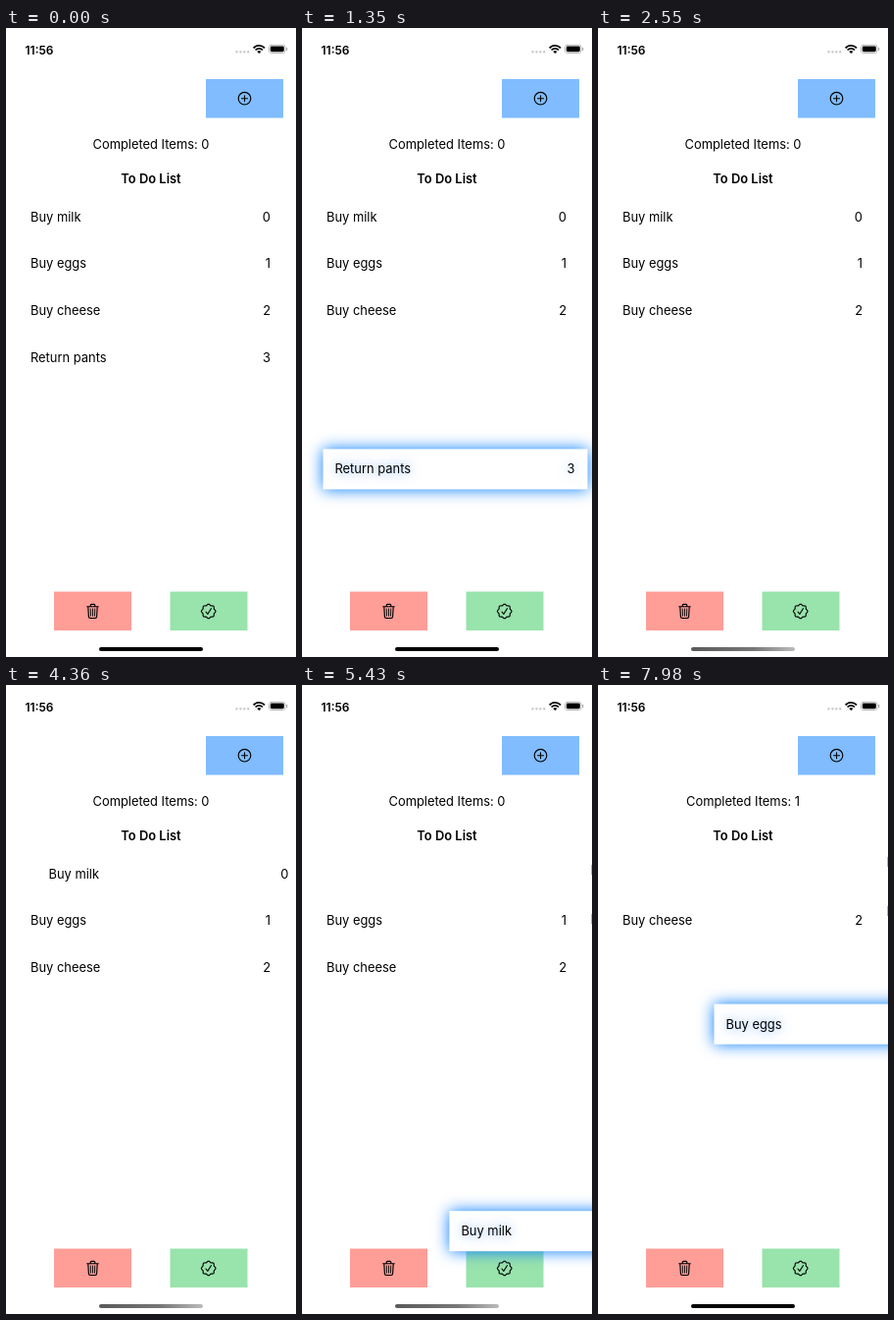
These frames come from a looping animation (296x640 px, 8000 ms). An HTML page:

```html
<!DOCTYPE html>
<html lang="en">
<head>
<meta charset="utf-8">
<title>To Do List</title>
<style>
  html, body { margin: 0; width: 100%; height: 100%; overflow: hidden; background: #fff; }
  #stage {
    position: relative; width: 296px; height: 640px; overflow: hidden; background: #fff;
    font: 12.9px/41px Inter, "Open Sans", sans-serif; color: #000;
  }
  #stage > * { position: absolute; }
  svg { left: 0; top: 0; }
  .line { left: 0; top: 98px; width: 296px; text-align: center; }
  .title { top: 133px; font-weight: 600; }
  .clock { left: 19.5px; top: 1.5px; font-size: 12px; font-weight: 600; }
  .row {
    left: 12.5px; width: 270px; height: 41px; padding: 0 12.5px; box-sizing: border-box;
    display: flex; justify-content: space-between; background: #fff;
  }
  #bar { left: 95px; top: 629.6px; width: 106px; height: 4px; border-radius: 2px; background: #000; }
  #edge {
    left: 295px; top: 183px; width: 1px; height: 60px;
    background: linear-gradient(#bbb 10px, transparent 0 50px, #bbb 0);
  }
</style>
</head>
<body>
<div id="stage">
  <svg width="296" height="640" fill="none" stroke="#000" stroke-width="1.15" stroke-linecap="round" stroke-linejoin="round">
    <g stroke="none">
      <path fill="#80bcff" d="M204 52h79v39.500h-79z"/>
      <path fill="#ff9d97" d="M49 573.500h79v39.500h-79z"/>
      <path fill="#99e3ac" d="M167.500 573.500h79v39.500h-79z"/>
    </g>
    <path stroke="#c8c8c8" stroke-width="2.400" stroke-dasharray="0 3.900" d="M235.500 24.300h12"/>
    <g stroke-width="1.800" stroke-linecap="butt">
      <path d="M252.600 20.300a8 8 0 0 1 11.400 0"/>
      <path d="M254.700 22.500a5 5 0 0 1 7.200 0"/>
      <path fill="#000" stroke="none" d="M258.300 26l-2-2.100a2.900 2.900 0 0 1 4 0z"/>
    </g>
    <rect x="268.500" y="17.300" width="16.600" height="8.200" rx="2.500" stroke="#aaa" stroke-width=".8"/>
    <rect x="269.800" y="18.600" width="14" height="5.600" rx="1.400" fill="#000" stroke="none"/>
    <path d="M286.600 20.200v2.300" stroke="#aaa"/>
    <g transform="translate(243.500 71.700)">
      <circle r="6.300"/>
      <path d="M-3 0h6M0-3v6"/>
    </g>
    <g transform="translate(88.500 593.500)">
      <path d="M-5.800-4.800H5.800M-2.300-5v-1.100q0-1 1-1h2.600q1 0 1 1V-5M-4.700-4.600l.6 10q.1 1.600 1.600 1.600h5q1.500 0 1.600-1.600l.6-10"/>
      <path stroke-width=".9" d="M-2.200-2.500l.2 7.200M0-2.500v7.200M2.200-2.500l-.2 7.200"/>
    </g>
    <g transform="translate(206.700 593.500)">
      <path id="seal"/>
      <path d="M-2.700.5l1.900 2.300L2.700-2.800"/>
    </g>
  </svg>
  <div class="clock">11:56</div>
  <div class="line" id="none">Completed Items: 0</div>
  <div class="line" id="one">Completed Items: 1</div>
  <div class="line title">To Do List</div>
  <div id="bar"></div>
  <div id="edge"></div>
</div>
<script>
const LOOP = 8000, PITCH = 47.6, DELETED = 2550, COMPLETED = 6280;
const $ = id => document.getElementById(id);

// Plays [time, style] pairs as hard steps.
function play(el, ...steps) {
  const frames = [...steps, [LOOP, steps.at(-1)[1]]].map(([t, style]) =>
    ({ offset: t / LOOP, easing: 'step-end', ...style }));
  el.animate(frames, { duration: LOOP, iterations: Infinity });
}

const show = opacity => ({ opacity });

const pose = ([x, y], glow = 0, opacity = 1) => ({
  transform: `translate(${x}px, ${y}px)`,
  boxShadow: `0 0 16px rgba(0, 122, 255, ${glow})`,
  textShadow: `0 0 12px rgba(0, 122, 255, ${glow * 0.6})`,
  opacity
});

const lift = i => Math.min(1, i / 2);
const held = () => 1;
const settle = i => 1 - i / 6;

// A move from a to b in count hard steps; a higher power slows down sooner.
function move(start, end, count, a, b, power, glow) {
  return Array.from({ length: count }, (_, i) => {
    const k = i / (count - 1), eased = 1 - (1 - k) ** power;
    const time = Math.floor((start + (end - start) * k) / 10) * 10;
    return [time, pose(a.map((v, j) => v + (b[j] - v) * eased), glow(i))];
  });
}

function addRow(label, index, ...steps) {
  const row = document.createElement('div');
  row.className = 'row';
  row.style.top = 171.8 + PITCH * index + 'px';
  row.style.zIndex = 9 - index;
  for (const text of [label, index]) {
    row.appendChild(document.createElement('span')).textContent = text;
  }
  $('stage').append(row);
  play(row, [0, pose([0, 0])], ...steps);
}

const up = [0, -PITCH];
const milkHeld = [113, 172], milkDrop = [140, 383.3];
const pantsHeld = [8.5, 113.4], pantsDrop = [-8.2, 239.4];

addRow('Buy milk', 0,
  ...move(4360, 4840, 7, [18.5, 0], milkHeld, 1, lift),
  ...move(5090, 5860, 10, milkHeld, milkDrop, 4, held),
  ...move(5930, 6110, 3, milkDrop, milkDrop, 1, settle),
  [COMPLETED, pose(milkDrop, 0, 0)]);

addRow('Buy eggs', 1,
  [COMPLETED, pose(up)],
  ...move(7540, 7980, 7, [18.5, -PITCH], [105.5, 105.6], 1, lift));

addRow('Buy cheese', 2, [COMPLETED, pose(up)]);

addRow('Return pants', 3,
  ...move(500, 1100, 8, [18.5, 0], pantsHeld, 2, lift),
  ...move(1350, 2120, 11, pantsHeld, pantsDrop, 2, held),
  ...move(2210, 2465, 4, pantsDrop, pantsDrop, 1, settle),
  [DELETED, pose(pantsDrop, 0, 0)]);

play($('none'), [0, show(1)], [COMPLETED, show(0)]);
play($('one'), [0, show(0)], [COMPLETED, show(1)]);

const solid = { background: '#000' };
const faded = { background: 'linear-gradient(90deg, #5a5a5a, #777 60%, #bbb)' };
play($('bar'), [0, solid], [DELETED, faded], [COMPLETED, solid]);

const edge = (y, opacity) => ({ transform: `translateY(${y}px)`, opacity });
play($('edge'), [0, edge(0, 0)], [4600, edge(0, 1)], [7680, edge(-8, 1)]);

// Scalloped badge outline with eight bumps.
const rim = Array.from({ length: 64 }, (_, i) => {
  const a = i * Math.PI / 32, r = 6.7 + 0.6 * Math.cos(8 * a);
  return `${(r * Math.cos(a)).toFixed(2)} ${(r * Math.sin(a)).toFixed(2)}`;
});
$('seal').setAttribute('d', `M${rim.join('L')}Z`);
</script>
</body>
</html>
```
